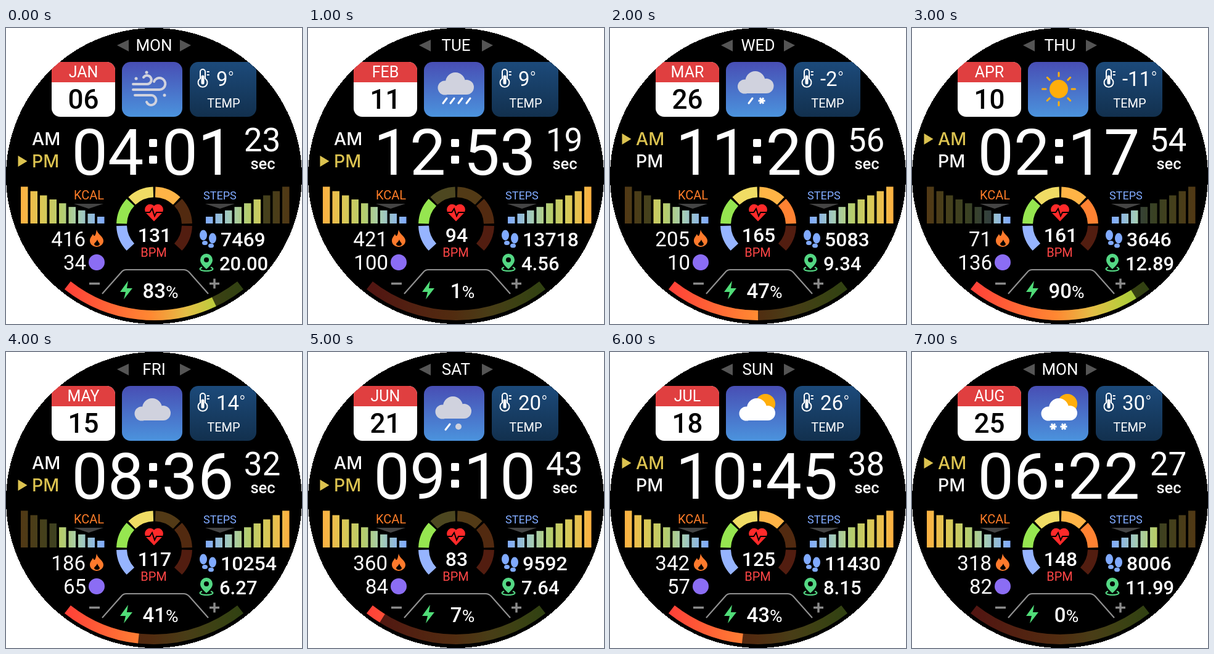
Write an HTML page that moves like this. It is 480x480 px and loops after 8 s.

```html
<!DOCTYPE html>
<html lang="en">
<head>
<meta charset="utf-8">
<title>Watch face</title>
<style>
html, body { margin: 0; width: 100%; height: 100%; overflow: hidden; background: #fff; }
svg { display: block; width: 480px; height: 480px; font-family: Roboto, sans-serif; }
.wide { font-family: Inter, sans-serif; font-weight: 500; }
</style>
</head>
<body>
<svg viewBox="0 0 480 480">
  <defs>
    <linearGradient id="sky" x2="0" y2="1"><stop stop-color="#484eb4"/><stop offset="1" stop-color="#4b93dd"/></linearGradient>
    <linearGradient id="night" x2="0" y2="1"><stop stop-color="#1c4a7a"/><stop offset="1" stop-color="#12304e"/></linearGradient>
    <linearGradient id="bars" gradientUnits="userSpaceOnUse" x1="324" x2="460" y1="0" y2="0">
      <stop stop-color="#80aaff"/><stop offset=".3" stop-color="#a5cdb4"/><stop offset=".5" stop-color="#b4cd6e"/>
      <stop offset=".75" stop-color="#dcc855"/><stop offset="1" stop-color="#ffb040"/>
    </linearGradient>
    <linearGradient id="charge" gradientUnits="userSpaceOnUse" x1="97" x2="384" y1="0" y2="0">
      <stop stop-color="#ff4038"/><stop offset=".48" stop-color="#ff8832"/><stop offset=".68" stop-color="#e4be46"/>
      <stop offset=".84" stop-color="#bccc3c"/><stop offset="1" stop-color="#96cc38"/>
    </linearGradient>
    <clipPath id="dial"><circle cx="240" cy="240" r="240"/></clipPath>
    <clipPath id="card"><rect x="74" y="55" width="103" height="89" rx="14"/></clipPath>
    <g id="cloud"><circle cx="221" cy="96" r="11.500"/><circle cx="238" cy="87" r="16"/><circle cx="256" cy="95" r="12"/><path d="M221 90H256V107H221z"/></g>
    <path id="flake" d="M-5.500 0H5.500M-2.800-4.800L2.800 4.800M2.800-4.800L-2.800 4.800" stroke-width="3"/>
  </defs>
  <circle cx="240" cy="240" r="240" shape-rendering="crispEdges"/>
  <path d="M180 28L199 19V38zM300 28L282 19V38z" fill="#555"/>
  <g clip-path="url(#dial)">
    <g clip-path="url(#card)"><path d="M74 55H177V144H74z" fill="#fff"/><path d="M74 55H177V88H74z" fill="#e03f40"/></g>
    <rect x="188" y="55" width="98" height="89" rx="14" fill="url(#sky)"/>
    <rect x="298" y="55" width="108" height="89" rx="14" fill="url(#night)"/>
  </g>
  <g fill="none" stroke="#fff" stroke-width="2" stroke-linecap="round">
    <path d="M315 82V71a4 4 0 0 1 8 0V82a7.500 7.500 0 1 1-8 0zM326.500 71h2.500M326.500 76h2.500"/><path d="M319 79V89" stroke-width="5"/>
  </g>
  <g fill="#fff"><rect x="232" y="180" width="13" height="13" rx="2"/><rect x="232" y="207" width="13" height="13" rx="2"/></g>
  <path d="M110 285H158L134 293zM323 285H371L347 293z" fill="#444"/>
  <path d="M240 313.500L227.500 300.500a8 8 0 0 1 12.500-12a8 8 0 0 1 12.500 12z" fill="#ff2a2a"/>
  <path d="M224 299H233L237 293L241 305L244 299H254" fill="none" stroke="#000" stroke-width="2"/>
  <path d="M147 327c1 7 11 11 11 18a11 10 0 0 1-22 0c0-5 3-7 5-11c1 3 2 3 3 3c2-3 2-6 3-10z" fill="#ff7a2c"/>
  <path d="M148 343c1 4 4 5 4 8a5 4 0 0 1-9 0c0-3 4-4 5-8z"/>
  <circle cx="147" cy="380" r="13" fill="#8b6df4"/>
  <g fill="#80aaff">
    <ellipse cx="320" cy="336" rx="6" ry="8.500"/><ellipse cx="322.500" cy="348.500" rx="4.500" ry="3.500"/>
    <ellipse cx="335" cy="341" rx="6" ry="8.500"/><ellipse cx="332.500" cy="353" rx="4.500" ry="3.500"/>
  </g>
  <path d="M325 391C320 386 315 382 315 376a10 10 0 0 1 20 0C335 382 330 386 325 391z" fill="#54d884"/>
  <circle cx="325" cy="376" r="4"/>
  <path d="M318 388c-8 3-1 6 7 6s15-3 7-6" fill="none" stroke="#54d884" stroke-width="2"/>
  <path d="M156 431L187 396Q190 392 195 392H288Q293 392 297 396L328 431" fill="none" stroke="#909090" stroke-width="2.200"/>
  <path d="M135 414.500H152M330 414.500H346M338 406.500V422.500" stroke="#8a8a8a" stroke-width="3.500"/>
  <path d="M198 410L185 428H194L191 440L205 422H196z" fill="#50dc78"/>
  <g id="live"></g>
</svg>
<script>
const FIELDS = ['day', 'month', 'date', 'sky', 'temp', 'hour', 'minute', 'second', 'half',
  'kcal', 'score', 'bpm', 'steps', 'stepBars', 'km', 'battery'];
const STATES = `
MON JAN 06 wind 9 04 01 23 PM 416 34 131 7469 6 20.00 83
TUE FEB 11 rain 9 12 53 19 PM 421 100 94 13718 9 4.56 1
WED MAR 26 sleet -2 11 20 56 AM 205 10 165 5083 9 9.34 47
THU APR 10 sun -11 02 17 54 AM 71 136 161 3646 3 12.89 90
FRI MAY 15 cloud 14 08 36 32 PM 186 65 117 10254 9 6.27 41
SAT JUN 21 hail 20 09 10 43 PM 360 84 83 9592 9 7.64 7
SUN JUL 18 fair 26 10 45 38 AM 342 57 125 11430 9 8.15 43
MON AUG 25 snow 30 06 22 27 AM 318 82 148 8006 5 11.99 0`
  .trim().split('\n').map(row => Object.fromEntries(row.split(' ').map((v, i) => [FIELDS[i], v])));

const ZONES = [[0, '#96b4ff'], [70, '#96e650'], [100, '#f0dc64'], [120, '#ffb446'], [140, '#ff8232'], [170, '#ff5a32']];
const DIM = 0.32, GOLD = '#dcc350', RED = '#ff4646', MIST = '#d0d2de', SUN = '#ffae0c';

const text = (x, y, size, str, fill = '#fff', anchor = 'middle', extra = '') =>
  `<text x="${x}" y="${y}" font-size="${size}" fill="${fill}" text-anchor="${anchor}" ${extra}>${str}</text>`;
const MEDIUM = 'font-weight="500"';

// Angles in degrees, clockwise from the right.
function arc(cx, cy, r, from, to, width, stroke, opacity = 1) {
  const at = deg => {
    const a = deg * Math.PI / 180;
    return `${cx + r * Math.cos(a)} ${cy + r * Math.sin(a)}`;
  };
  return `<path d="M${at(from)}A${r} ${r} 0 0 ${to > from ? 1 : 0} ${at(to)}" fill="none"
    stroke="${stroke}" stroke-width="${width}" opacity="${opacity}"/>`;
}

const cloud = (dx, dy, fill = MIST) => `<use href="#cloud" x="${dx}" y="${dy}" fill="${fill}"/>`;
const lines = (d, stroke, width) =>
  `<path d="${d}" fill="none" stroke="${stroke}" stroke-width="${width}" stroke-linecap="round"/>`;
const drop = x => lines(`M${x + 3} 114L${x - 3} 122`, '#fff', 3);
const flake = (x, y) => `<use href="#flake" x="${x}" y="${y}" stroke="#fff"/>`;
const dot = (x, y, r, fill) => `<circle cx="${x}" cy="${y}" r="${r}" fill="${fill}"/>`;
const fairSky = () => dot(252, 84, 16, SUN) + cloud(0, 4, '#fff');

const SKIES = {
  wind: () => lines('M206 91H229a7 7 0 1 0-6-11M206 100H249a9.500 9.500 0 1 0-9-13M209 109H235a8 8 0 1 1-7 11', MIST, 4)
    + dot(211, 82, 2.5, MIST) + dot(228, 72, 2.5, MIST) + dot(257, 109, 2.5, MIST),
  rain: () => cloud(1, 1) + [222, 234, 247, 260].map(drop).join(''),
  sleet: () => cloud(-2.5, -1) + drop(228) + flake(246, 118),
  sun: () => dot(238, 99, 15, SUN) + lines([...Array(8)].map((_, i) => {
    const c = Math.cos(i * Math.PI / 4), s = Math.sin(i * Math.PI / 4);
    return `M${238 + 21 * c} ${99 + 21 * s}L${238 + 26.5 * c} ${99 + 26.5 * s}`;
  }).join(''), SUN, 3),
  cloud: () => cloud(-1, 4),
  hail: () => cloud(-3, 1) + lines('M230 117L223 126', '#fff', 3) + dot(244, 121, 5, MIST),
  fair: fairSky,
  snow: () => fairSky() + flake(229, 121) + flake(246, 121)
};

function bars(lit) {
  return [...Array(9)].map((_, i) => {
    const h = 11 + 4.8 * i + 0.16 * i * i;
    return `<rect x="${324 + 15.5 * i}" y="${317 - h}" width="11.5" height="${h}" fill="url(#bars)" opacity="${i < lit ? 1 : DIM}"/>`;
  }).join('');
}

function draw(s) {
  const pm = s.half === 'PM', top = pm ? 207 : 171;
  const kcalBars = Math.floor(Math.min(1, s.kcal / 300) * 9);
  const charge = Math.round(s.battery * 12 / 100) / 12;
  const start = 128.3, span = 76.6;
  return [
    text(240, 37, 26, s.day),
    text(125.5, 80, 25, s.month),
    text(125.5, 131, 44, s.date, '#000', 'middle', MEDIUM),
    SKIES[s.sky](),
    text(341, 94, 33, `${s.temp}<tspan font-size="28" font-weight="300" dy="-3">°</tspan>`, '#fff', 'start'),
    text(353, 129, 20, 'TEMP'),
    text(42, 190, 28.5, 'AM', pm ? '#fff' : GOLD, 'start', 'class="wide"'),
    text(42, 226, 28.5, 'PM', pm ? GOLD : '#fff', 'start', 'class="wide"'),
    `<path d="M19.500 ${top}L34.500 ${top + 9}L19.500 ${top + 18}z" fill="${GOLD}"/>`,
    text(165, 238, 104, s.hour),
    text(311, 238, 104, s.minute),
    text(415.5, 200, 53, s.second),
    text(416.5, 229, 25.5, 'sec', '#fff', 'middle', MEDIUM),
    text(159, 278, 20, 'KCAL', '#ff7d28', 'end'),
    text(320, 278, 18, 'STEPS', '#80aaff', 'start'),
    `<g transform="matrix(-1 0 0 1 483.500 0)">${bars(kcalBars)}</g>`,
    bars(+s.stepBars),
    ...ZONES.map(([min, color], i) =>
      arc(240.5, 319, 53, 136.8 + 45 * i, 178.2 + 45 * i, 17, color, s.bpm >= min ? 1 : DIM)),
    text(241, 346.5, 32, s.bpm, '#fff', 'middle', MEDIUM),
    text(239.5, 371, 20, 'BPM', RED),
    text(129, 354, 33, s.kcal, '#fff', 'end'),
    text(130, 392, 33, s.score, '#fff', 'end'),
    text(348, 354, 32, s.steps, '#fff', 'start', MEDIUM),
    text(346, 392.5, 31, s.km, '#fff', 'start', MEDIUM),
    text(250.5, 438, 33, `${s.battery}<tspan font-size="28" font-weight="400">%</tspan>`, '#fff', 'middle', MEDIUM),
    arc(240, 240, 226, start, start - span, 16, 'url(#charge)', DIM),
    charge ? arc(240, 240, 226, start, start - span * charge, 16, 'url(#charge)') : ''
  ].join('');
}

const live = document.getElementById('live');
let shown = -1;
function tick() {
  const index = Math.floor(performance.now() / 1000) % STATES.length;
  if (index !== shown) live.innerHTML = draw(STATES[shown = index]);
  requestAnimationFrame(tick);
}
tick();
</script>
</body>
</html>
```
